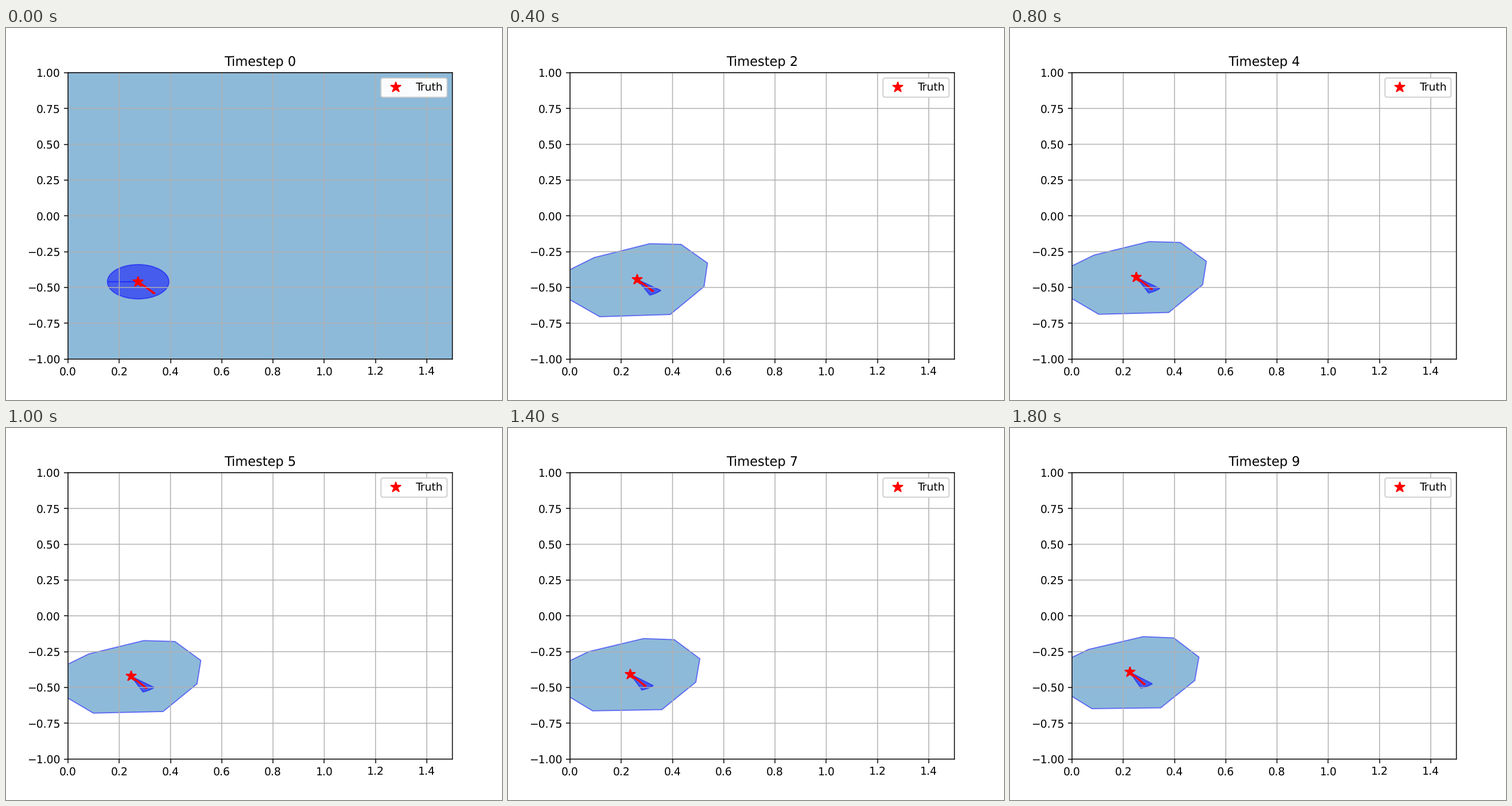
A matplotlib script for the animation above (2 s loop, 864 by 648 pixels).

```python
import matplotlib.pyplot as plt
import numpy as np
from matplotlib.animation import FuncAnimation
from matplotlib.patches import Polygon, Wedge

STEPS = 10
RADIUS = 0.12
SPREAD = 13  # half opening angle of the heading wedge, degrees

# Linear flow that carries the truth and its bound from step 1 to the end
FLOW = np.array([(-0.028, 0.023), (-0.040, 0.0)])
OFFSET = np.array([-0.0246, 0.0697])

TRUTH = np.array([0.268, -0.452])
BOUND = np.array([
    (-0.106, -0.483), (0.099, -0.300), (0.316, -0.202), (0.439, -0.206),
    (0.543, -0.336), (0.530, -0.500), (0.398, -0.696), (0.122, -0.713)])
EVERYWHERE = [(-5, -5), (-5, 5), (5, 5), (5, -5)]

# Subpixel placement of thin lines and glyphs
plt.rcParams.update({"path.snap": False, "text.hinting": "none"})


def drift(points, step):
    """Move points along the flow, slowing down slightly."""
    u = (step - 1) / (STEPS - 2)
    return points + (points @ FLOW.T + OFFSET) * (u + 0.08 * u * (1 - u))


fig, ax = plt.subplots(figsize=(6.4, 4.8), dpi=135)


def draw(step):
    ax.clear()
    x, y = drift(TRUTH, step)
    heading = -51.9 - 0.42 * step
    if step == 0:
        # Nothing is known yet: any position, any heading
        bound, start, end = EVERYWHERE, -179.5, 179.5
    else:
        bound = drift(BOUND, step)
        start, end = heading - SPREAD, heading + SPREAD

    ax.add_patch(Polygon(bound, facecolor="tab:blue", edgecolor="blue",
                         alpha=0.5))
    ax.add_patch(Wedge((x, y), RADIUS, start, end, color="blue", alpha=0.5))
    angle = np.radians(heading)
    ax.arrow(x, y, 0.1 * np.cos(angle), 0.1 * np.sin(angle),
             color="red", linewidth=1.5)
    ax.plot(x, y, "r*", markersize=10, label="Truth")

    ax.set_xlim(0, 1.5)
    ax.set_ylim(-1, 1)
    ax.grid(True)
    ax.legend(loc="upper right", framealpha=0.97)
    ax.set_title(f"Timestep {step}")


anim = FuncAnimation(fig, draw, frames=STEPS, init_func=lambda: draw(0),
                     interval=200, repeat=True, repeat_delay=0)
plt.show()
```
